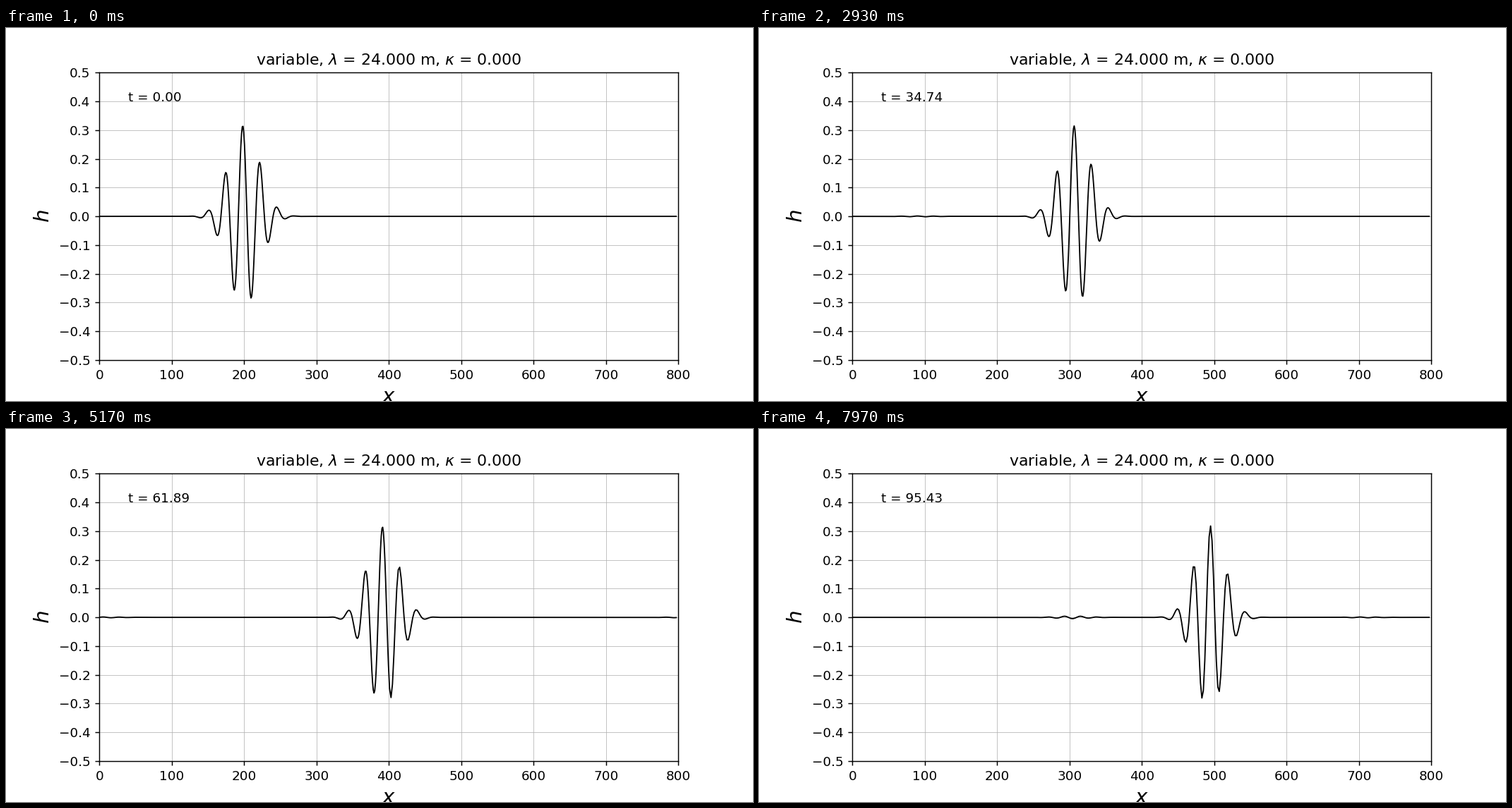
Write a matplotlib script that moves like this. It is 1058x529 px and loops after 8000 ms.

```python
import numpy as np
import matplotlib.pyplot as plt
from matplotlib.animation import FuncAnimation

FRAMES, FPS = 240, 30
STEPS = 5                      # time steps per frame
G, DEPTH = 9.8, 1.0
C = np.sqrt(G * DEPTH)
LENGTH, WAVELENGTH, WIDTH, AMP = 800, 24, 30, 0.317

# Periodic grid: fine cells on the left half, coarse cells on the right.
dx = np.r_[np.full(400, 1.0), np.full(200, 2.0)]
x = np.cumsum(dx) - dx / 2
gap = (dx + np.roll(dx, 1)) / 2    # distance across each left cell face
dt = 0.25 * dx.min() / C


def rates(state):
    """Linear shallow water: h in the cells, u on their left faces."""
    h, u = state
    dh = -DEPTH * (np.roll(u, -1) - u) / dx
    du = -G * (h - np.roll(h, 1)) / gap
    return np.array([dh, du])


def step(s):
    k1 = rates(s)
    k2 = rates(s + dt / 2 * k1)
    k3 = rates(s + dt / 2 * k2)
    k4 = rates(s + dt * k3)
    return s + dt / 6 * (k1 + 2 * k2 + 2 * k3 + k4)


def simulate():
    h = AMP * np.sin(2 * np.pi * x / WAVELENGTH)
    h *= np.exp(-((x - LENGTH / 4) / WIDTH) ** 2)
    u = C / DEPTH * (h + np.roll(h, 1)) / 2
    state = np.array([h, u])
    waves = []
    for _ in range(FRAMES):
        waves.append(state[0])
        for _ in range(STEPS):
            state = step(state)
    return waves


waves = simulate()

fig, ax = plt.subplots(figsize=(8, 4), dpi=132.25)
ax.set_xlim(0, LENGTH)
ax.set_ylim(-0.5, 0.5)
ax.set_yticks(np.linspace(-0.5, 0.5, 11))
ax.grid(linewidth=0.5, alpha=0.8)
ax.set_title(r"variable, $\lambda$ = 24.000 m, $\kappa$ = 0.000")
ax.set_xlabel("$x$", fontsize=16)
ax.set_ylabel("$h$", fontsize=16)
line, = ax.plot([], [], color="black", linewidth=1)
clock = ax.text(40, 0.4, "")


def draw(i):
    line.set_data(x[:-1], waves[i][:-1])
    clock.set_text(f"t = {i * STEPS * dt:.2f}")
    return line, clock


anim = FuncAnimation(fig, draw, frames=FRAMES, interval=1000 / FPS,
                     repeat=True, repeat_delay=0)
plt.show()
```
